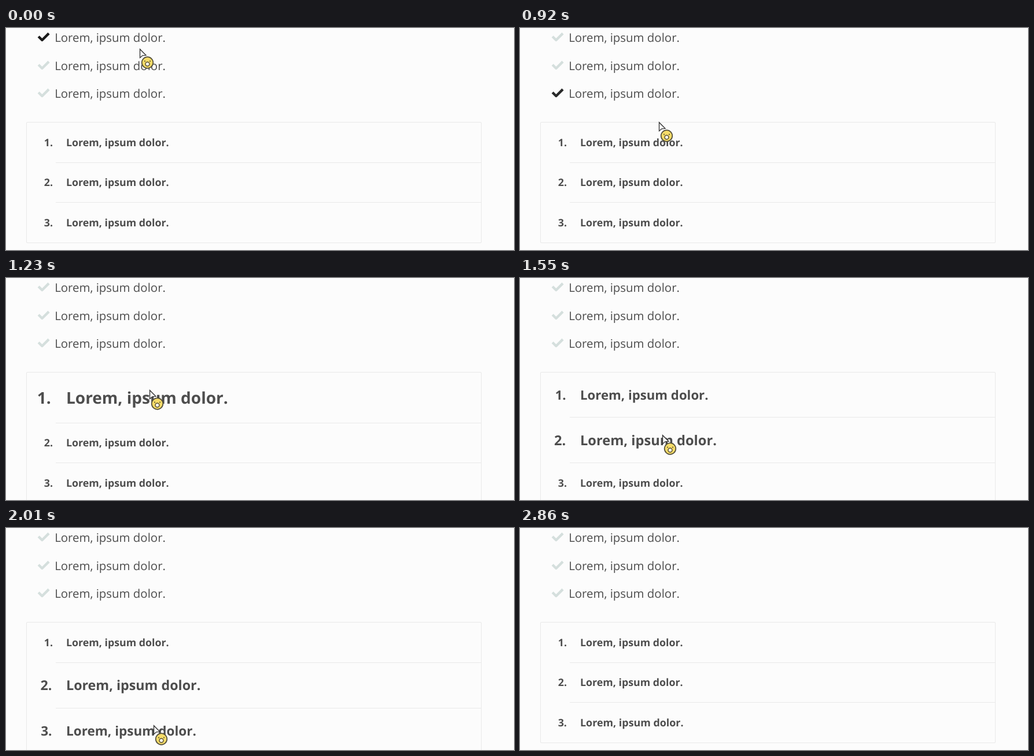
Animation of 878x385 px, one loop 2930 ms. Source, as an HTML page:

```html
<!DOCTYPE html>
<html lang="en">
<head>
<meta charset="utf-8">
<title>List hover</title>
<style>
  html, body { margin: 0; width: 100%; height: 100%; overflow: hidden; background: #fcfcfc; }
  svg { display: block; width: 878px; height: 385px; }
  text { font-family: "Open Sans", "Noto Sans", sans-serif; fill: #4d4d4d; text-rendering: geometricPrecision; }
  .item { font-size: 20.4px; }
  .row { font-weight: 700; }
  .num { text-anchor: end; }
  .line { fill: none; stroke: #e9e9e9; }
  .check { fill: none; stroke-width: 4.4px; stroke-linejoin: round; }
</style>
</head>
<body>
<svg viewBox="0 0 878 385">
  <g id="items"></g>
  <g id="rows"></g>
  <g id="cursor">
    <path d="M.5 .7V15.500L5 11.800 11 11.300z" fill="#f4f4f4" stroke="#333" stroke-width="1.300"/>
    <g fill="#4a4430">
      <circle cx="13.500" cy="24" r="9.800" fill="#f6dc68" stroke="#544f3a" stroke-width="1.700"/>
      <circle cx="9" cy="21.500" r="1"/>
      <circle cx="18" cy="21.500" r="1"/>
      <circle cx="13.500" cy="26.500" r="3.500" fill="#f7f5e8" stroke="#5b5233" stroke-width="1.500"/>
    </g>
  </g>
</svg>
<script>
const LOOP = 2930, STEPS = 38, STEP = LOOP / STEPS, FADE = 300;
const TEXT = 'Lorem, ipsum dolor.', COUNT = 3;
const TOP = 163.9, ROW = 69.4, GROW = 18.2, SMALL = 17.8, BIG = 28;
const ITEM_GAP = 48.6, PALE = [213, 223, 221], DARK = 27;

// times at which the pointer passes from one entry to the next
const itemSwitch = [-FADE, 10, 580, 900];
const rowSwitch = [930, 1443, 1922, 2591];

// pointer tip: time, x, y
const path = [
  [0, 231, 36], [308, 238, 67], [385, 238, 67], [925, 240, 163], [1234, 248, 194],
  [1542, 246, 272], [2005, 255, 342], [2313, 255, 342], [2390, 258, 346], [2670, 270, 425]
];

const $ = id => document.getElementById(id);
const mix = (a, b, p) => a + (b - a) * p;

function set(el, attrs) {
  for (const k in attrs) el.setAttribute(k, attrs[k]);
}

function add(parent, tag, attrs, text = '') {
  const el = document.createElementNS('http://www.w3.org/2000/svg', tag);
  set(el, attrs);
  el.textContent = text;
  return parent.appendChild(el);
}

// the CSS "ease" curve
function ease(x) {
  if (x <= 0) return 0;
  if (x >= 1) return 1;
  const bez = (u, a, b) => 3 * (1 - u) ** 2 * u * a + 3 * (1 - u) * u * u * b + u ** 3;
  let lo = 0, hi = 1;
  for (let i = 0; i < 24; i++) {
    const mid = (lo + hi) / 2;
    if (bez(mid, .25, .25) < x) lo = mid; else hi = mid;
  }
  return bez(lo, .1, 1);
}

const hover = (t, times, i) =>
  ease((t - times[i]) / FADE) - ease((t - times[i + 1]) / FADE);

const list = make => Array.from({ length: COUNT }, (_, i) => make(i));

const checks = list(i => {
  const y = Math.round(i * ITEM_GAP);
  add($('items'), 'text', { class: 'item', x: 84.2, y: 24 + y }, TEXT);
  return add($('items'), 'path', { class: 'check', d: `M56.2 ${14.8 + y}l6.2 6.2 11.6-11.6` });
});

const frame = add($('rows'), 'rect', { class: 'line', x: 35.5, y: 163.5, width: 786, rx: 1.5 });
const rows = list(i => ({
  rule: add($('rows'), 'path', { class: 'line' }),
  num: add($('rows'), 'text', { class: 'row num' }, i + 1 + '.'),
  label: add($('rows'), 'text', { class: 'row', x: 104 }, TEXT)
}));

function drawItems(t) {
  checks.forEach((check, i) => {
    const p = hover(t, itemSwitch, i);
    set(check, { stroke: `rgb(${PALE.map(c => Math.round(mix(c, DARK, p)))})` });
  });
}

function drawRows(t) {
  let y = TOP;
  rows.forEach(({ rule, num, label }, i) => {
    const p = hover(t, rowSwitch, i);
    const size = mix(SMALL, BIG, p), h = ROW + GROW * p;
    const base = Math.round(y + h / 2 + 6.2 + p * 4.3);
    // every row but the first has a rule above it
    if (i) set(rule, { d: `M86 ${Math.floor(y) + .5}H821` });
    set(num, { x: 81 - p * 3.2, y: base, 'font-size': size });
    set(label, { y: base, 'font-size': size });
    y += h;
  });
  set(frame, { height: Math.floor(y) - 163 });
}

function drawCursor(t) {
  const i = path.findIndex(key => key[0] > t);
  const b = path.at(i), a = i > 0 ? path[i - 1] : b;
  const p = a === b ? 0 : (t - a[0]) / (b[0] - a[0]);
  const [x, y] = [1, 2].map(k => Math.round(mix(a[k], b[k], p)));
  set($('cursor'), { transform: `translate(${x} ${y})` });
}

function draw(t) {
  drawItems(t);
  drawRows(t);
  drawCursor(t);
}

// the screen refreshes in even steps
function tick(now) {
  const t = Math.max(0, now - start) % LOOP;
  draw(Math.min(STEPS - 1, Math.floor((t + 8) / STEP)) * STEP);
  requestAnimationFrame(tick);
}

const start = performance.now();
draw(0);
requestAnimationFrame(tick);
</script>
</body>
</html>
```
